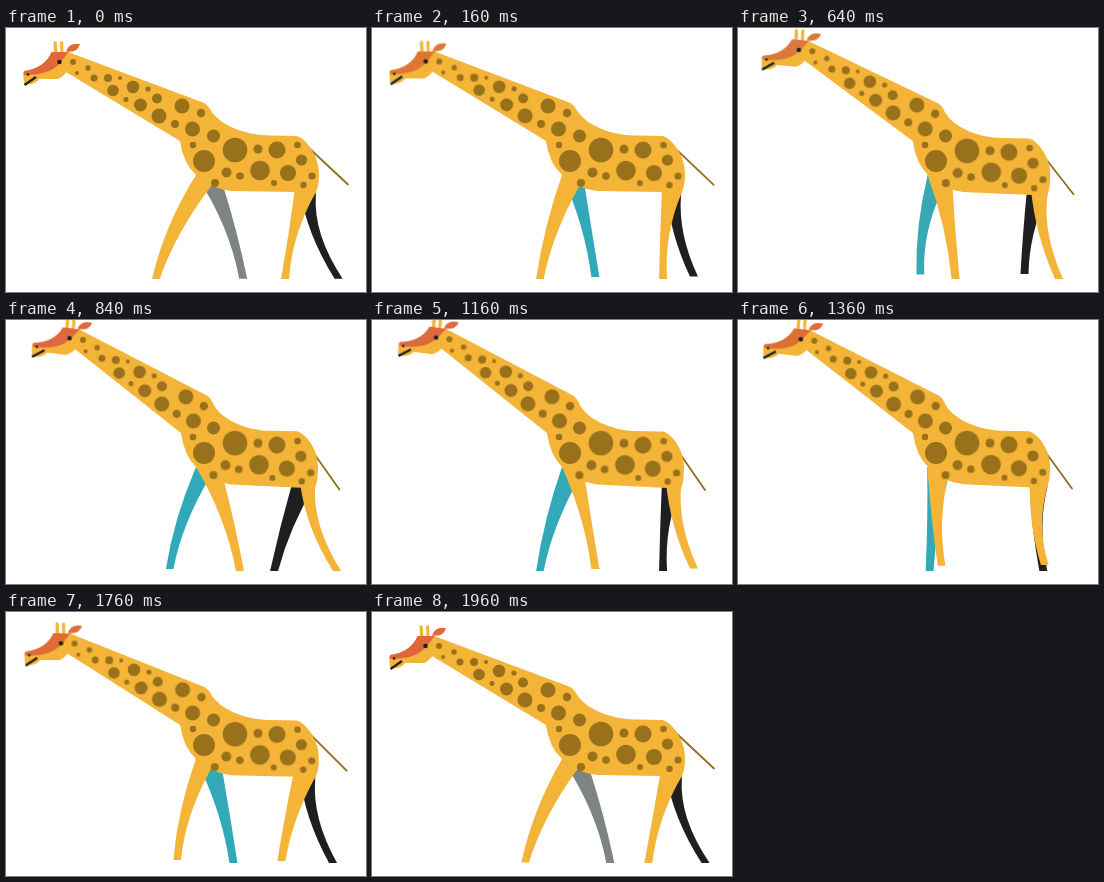
Write an HTML page without scripts that moves like this. It is 360 by 264 pixels and loops after 2 s.

```html
<!DOCTYPE html>
<html lang="en">
<head>
<meta charset="utf-8">
<title>Walking giraffe</title>
<style>
html, body { margin: 0; width: 100%; height: 100%; overflow: hidden; background: #fff; }
svg { display: block; width: 360px; height: 264px; }

.coat { fill: #f3b438; }
.spots { fill: #98711a; }
.dark { fill: #1f1f21; }
.mask { fill: #e0673a; animation: mask 2s linear infinite; }
.tail { fill: none; stroke: #8f6f1c; stroke-width: 1.8; stroke-linecap: round; }
.mouth { stroke: #1f1f21; stroke-width: 2.2; }

/* Slow sway with a short rest at each end */
.body, .tail, .neck, .rump { animation: 2s cubic-bezier(.37, 0, .63, 1) infinite; }
.body { animation-name: body; }
.tail { animation-name: tail; }
.neck { animation-name: nod; transform-origin: 184px 117px; }
.rump { animation-name: tilt; transform-origin: 205px 122px; }

/* Far legs walk half a cycle behind the near ones */
.fore { animation: fore 2s linear infinite; }
.hind { animation: hind 2s linear infinite; }
.far.hind { animation-delay: -1s; }
.far.fore { animation: fore 2s linear -1s infinite, shade 2s linear infinite; }

@keyframes nod {
  0%, 3%, 98%, 100% { transform: none; }
  48%, 60% { transform: translate(-1px, -.5px) rotate(7.3deg); }
}
@keyframes tilt {
  0%, 3%, 98%, 100% { transform: none; }
  48%, 60% { transform: rotate(2.8deg); }
}
@keyframes tail {
  0%, 3%, 98%, 100% { d: path("M304,121L342,156.500"); }
  48%, 60% { d: path("M304,128L333,170"); }
}
@keyframes body {
  0%, 3%, 98%, 100% { d: path("M62,24L197,74.500Q201,76 204,81C213,97 238,107 263,107.500L291,108C300,111 314,128 313,148Q313,158 309,166L289,164L225,163Q205,161 190,147Q177,135 174,113L60,44Z"); }
  48%, 60% { d: path("M73.800,8.800L201,75.500Q204.500,77.500 207,83C214,99 239,110 262,111L291,111.500C300,114 313,130 312,150Q312,160 309,169L295,168L225,164.500Q205,162 190,147Q178,135 175,113L69.300,28.400Z"); }
}
@keyframes fore {
  0%, 100% { d: path("M190,147Q158,198 146,251h7.500Q170,204 206,157Z"); }
  8% { d: path("M190,147Q172,198 164,251h7.500Q181,204 208,157Z"); }
  22% { d: path("M189,147Q197,198 197,251h8Q205,204 211,158Z"); }
  42% { d: path("M190,147Q220,198 230,251h8Q229,204 218,161Z"); }
  49% { d: path("M190,147Q225,198 235,251h8Q233,204 219,162Z"); }
  58% { d: path("M190,147Q213,198 219.500,249h8Q220,204 213,160Z"); }
  72% { d: path("M189,147Q185,198 192,244.500h7.500Q192,204 208,158Z"); }
  78% { d: path("M189.500,147Q181,198 186,245.500h8Q187,204 207,158Z"); }
  92% { d: path("M190,147Q168,198 160,249h7.500Q176,204 204,157Z"); }
}
@keyframes hind {
  0%, 100% { d: path("M289,160Q283,206 275,251h8Q286,206 310,164V150Z"); }
  8% { d: path("M290,160Q288,206 287,251h8Q292,206 310,164V150Z"); }
  22% { d: path("M292,160Q295,206 307,251h8Q302,206 310,165V150Z"); }
  42% { d: path("M294,162Q299,206 327,251h8Q307,206 309,168V150Z"); }
  49% { d: path("M294,162Q301,206 330,251h8Q307,206 310,166V150Z"); }
  58% { d: path("M294,162Q298,206 318,248.500h8Q306,206 309,167V150Z"); }
  72% { d: path("M291,161Q288,206 297,243.500h7.500Q295,206 310,165V150Z"); }
  78% { d: path("M290,160Q289,206 290,244h8Q294,206 310,165V150Z"); }
  92% { d: path("M287,160Q274,206 264,251h8Q284,206 309,165V150Z"); }
}
@keyframes shade {
  0% { fill: #7e8383; animation-timing-function: step-end; }
  5% { fill: #32a9b9; }
  8% { fill: #32a9b9; }
  22% { fill: #4ba5aa; }
  36% { fill: #32a9b9; animation-timing-function: step-end; }
  95%, 100% { fill: #7e8383; }
}
@keyframes mask {
  0%, 98%, 100% { fill: #e0673a; }
  8% { fill: #de7633; }
  22% { fill: #d99f37; }
  36%, 58% { fill: #dc683e; }
  78% { fill: #dc742f; }
}
</style>
</head>
<body>
<svg viewBox="0 0 360 264" role="img" aria-label="Walking giraffe">
  <path class="far hind dark"/>
  <path class="far fore"/>
  <path class="tail"/>
  <path class="body coat"/>
  <path class="hind coat"/>
  <path class="fore coat"/>

  <g class="spots">
    <circle cx="198" cy="133" r="11"/>
    <circle cx="207.500" cy="108" r="6.500"/>
    <circle cx="187" cy="117" r="3.200"/>
    <g class="rump">
      <circle cx="229" cy="122" r="12.300"/>
      <circle cx="252" cy="121" r="4.500"/>
      <circle cx="271" cy="122" r="8.500"/>
      <circle cx="291.500" cy="117" r="3.300"/>
      <circle cx="295.500" cy="132" r="5.600"/>
      <circle cx="306" cy="148" r="3.600"/>
      <circle cx="297.500" cy="157" r="3.200"/>
      <circle cx="282" cy="145" r="8"/>
      <circle cx="254" cy="142.500" r="9.800"/>
      <circle cx="268" cy="155" r="3"/>
      <circle cx="234" cy="148" r="3.800"/>
      <circle cx="220.500" cy="144.500" r="5"/>
      <circle cx="209" cy="155" r="4"/>
    </g>
  </g>

  <g class="neck">
    <g class="spots">
      <circle cx="67" cy="34" r="3"/>
      <circle cx="82" cy="40" r="2.700"/>
      <circle cx="71" cy="45" r="2"/>
      <circle cx="88" cy="50" r="3.500"/>
      <circle cx="102" cy="50" r="4"/>
      <circle cx="114" cy="50" r="2"/>
      <circle cx="107" cy="62.500" r="5.800"/>
      <circle cx="120" cy="71.500" r="2.500"/>
      <circle cx="127" cy="59" r="6.300"/>
      <circle cx="142" cy="61" r="2.600"/>
      <circle cx="151" cy="70.500" r="5"/>
      <circle cx="134.500" cy="77" r="6.500"/>
      <circle cx="153" cy="88" r="7.500"/>
      <circle cx="176" cy="78" r="7.500"/>
      <circle cx="195" cy="85" r="4.200"/>
      <circle cx="169" cy="96" r="4"/>
      <circle cx="186.500" cy="101" r="7.500"/>
    </g>
    <path class="coat" d="M48,25L47.500,14q1.700,-1.500 3.200,0L51.500,25ZM54.500,25L54,14q1.700,-1.500 3.200,0L57.500,25Z"/>
    <path class="coat" d="M63,24H46Q40,39 17,44L18,56Q28,58 33,51H52Q59,48 62,41Z"/>
    <path class="mask" d="M45.500,24H62.500Q57,32 51,38Q41,47 18,47V43Q39,40 45.500,24Z"/>
    <path class="mask" d="M60,23.500Q63,14 74,16Q72,25 60,23.500Z"/>
    <path class="mouth" d="M18.500,57L30,49"/>
    <circle class="dark" cx="53.500" cy="34" r="2.300"/>
    <circle class="dark" cx="22" cy="46.500" r="1.300"/>
  </g>
</svg>
</body>
</html>
```
